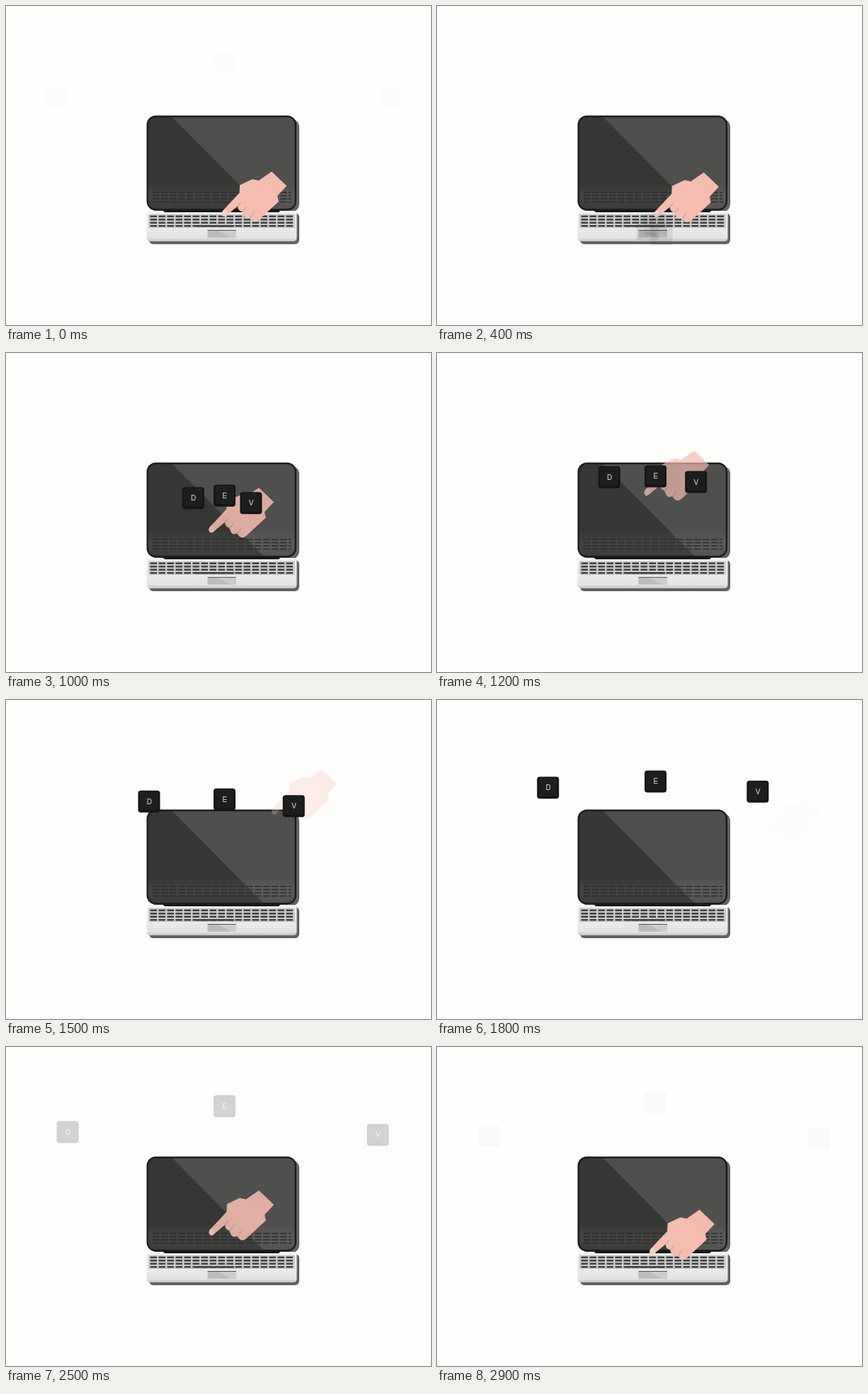
An HTML page that plays this animation: 600x450 px, repeating every 3000 ms.

```html
<!DOCTYPE html>
<html lang="en">
<head>
<meta charset="utf-8">
<title>Laptop keys</title>
<style>
html, body { margin: 0; width: 100%; height: 100%; overflow: hidden; background: #fefefd; }
svg { display: block; width: 600px; height: 450px; }
text { font: 10px "Liberation Sans", Arial, sans-serif; fill: #e4e4e4; text-anchor: middle; }
</style>
</head>
<body>
<svg viewBox="0 0 600 450" xmlns="http://www.w3.org/2000/svg">
  <defs>
    <clipPath id="glass"><rect x="201" y="157" width="206.500" height="129" rx="10"/></clipPath>
    <linearGradient id="sheen" x1="0" y1="0" x2="0" y2="1">
      <stop offset="0" stop-color="#fff" stop-opacity="0"/>
      <stop offset=".5" stop-color="#fff" stop-opacity=".07"/>
      <stop offset="1" stop-color="#fff" stop-opacity=".02"/>
    </linearGradient>
    <linearGradient id="metal" x1="0" y1="0" x2="0" y2="1">
      <stop offset="0" stop-color="#f3f3f3"/>
      <stop offset=".88" stop-color="#e4e4e4"/>
      <stop offset="1" stop-color="#c4c4c4"/>
    </linearGradient>
  </defs>

  <!-- screen -->
  <rect x="204" y="159" width="210" height="132" rx="12" fill="#636363"/>
  <rect x="198.500" y="154.500" width="211.500" height="134" rx="13" fill="#1c1c1c"/>
  <g clip-path="url(#glass)">
    <rect x="198" y="154" width="214" height="136" fill="#363634"/>
    <path d="M232 154H412V290H367Z" fill="#4f4f4d"/>
    <rect x="198" y="250" width="214" height="37" fill="url(#sheen)"/>
    <g id="mirror" stroke="#2a2a2a" stroke-width="2" opacity=".75"/>
  </g>

  <!-- base -->
  <rect x="202" y="292" width="212" height="44" rx="6" fill="#626262"/>
  <path d="M200 289H408Q410.500 289 410.500 292V327Q410.500 332 405 332H204Q198.500 332 198.500 327V292Q198.500 289 200 289Z" fill="url(#metal)"/>
  <path d="M221 288H388L385 291H224Z" fill="#171717"/>
  <rect x="201" y="293.500" width="207" height="19.500" rx="1" fill="#cbcbcb"/>
  <g id="board" stroke="#414141" stroke-width="2.400"/>
  <rect x="284.500" y="316" width="40.500" height="10.800" fill="#bcbcbc"/>
  <path d="M298 316H325V326.800H317Z" fill="#cdcdcd"/>
  <path d="M284.500 316.500H325" stroke="#555"/>

  <g id="hand">
    <path d="M306 295Q304.500 291.500 308 288L330.500 264L331 253L349 244.500L358 246.500L376 234L397 254L384 268L386 276L359 301Q354 306 349 303L345 298Q340 301 337 297L334 290Q329 290 328 282.500L312.500 295.500Q308 299 306 295Z" fill="#f6bfb2"/>
    <path d="M358 246.500L376 234L397 254L383 269Q373 254 358 246.500Z" fill="#f5bcb0"/>
    <path d="M306 295Q304.500 291.500 308 288L311 287L314.500 293.500L312.500 295.500Q308 299 306 295Z" fill="#fad2c6"/>
    <path d="M328 282.500L333 277M335 291L340 284M346 299L351 291" fill="none" stroke="#dc9f91" stroke-width="1.200" stroke-linecap="round"/>
  </g>
  <g id="keys"></g>
</svg>
<script>
const NS = 'http://www.w3.org/2000/svg';
const LOOP = 3000, STEP = 100, PRESS = 220;
const byId = id => document.getElementById(id);
const clamp = v => Math.min(1, Math.max(0, v));

function add(parent, tag, attrs) {
  const el = document.createElementNS(NS, tag);
  for (const k in attrs) el.setAttribute(k, attrs[k]);
  return parent.appendChild(el);
}

// Four rows of dashes for the keyboard and its reflection
function rows(parent, left, right, top) {
  for (let y = top; y < top + 18; y += 4.5) {
    add(parent, 'path', { d: `M${left} ${y}H${right}`, 'stroke-dasharray': '9.5 2.5' });
  }
}
rows(byId('board'), 203.5, 406, 296.8);
add(byId('board'), 'path', { d: 'M268 310.300H322' });
rows(byId('mirror'), 207, 403, 263);

// Smooth curve through points [time, x, y], at rest at both ends
function curve(pts, t) {
  const last = pts.length - 1;
  if (t >= pts[last][0]) return pts[last].slice(1);
  let i = 0;
  while (pts[i + 1][0] < t) i++;
  const a = pts[i], b = pts[i + 1], h = b[0] - a[0], u = (t - a[0]) / h;
  const slope = (n, k) => n === 0 || n === last ? 0
    : (pts[n + 1][k] - pts[n - 1][k]) / (pts[n + 1][0] - pts[n - 1][0]);
  const ease = u * u * (3 - 2 * u);
  return [1, 2].map(k => a[k] + (b[k] - a[k]) * ease
    + h * u * (1 - u) * (slope(i, k) * (1 - u) - slope(i + 1, k) * u));
}

// The hand leaves the keyboard and comes back along the same path
const handPath = [
  [0, 4.5, 4], [480, -12, -12], [720, -19, -31.5], [980, -13, -96],
  [1120, 13, -126], [1270, 65, -137], [1430, 148, -97]
];
const handAlpha = away => clamp(1 - (away / 1430) ** 3);

// Keys rise with a power ease; the outer two swing sideways and lag behind
const rise = t => 63.5 + 171 * (Math.max(0, LOOP - t) / 2300) ** 2.4;
const swing = (t, reach, mid, rate) => reach / (1 + Math.exp((mid - t) / rate));
const lag = (side, t) => 46 * (side / 236) ** 4 + 6 * clamp((1200 - t) / 500);
const keyAlpha = t => clamp((t - 350) / 600) * clamp(((3050 - t) / 1250) * Math.min(1, Math.max(0, 3050 - t) / 1250));

const spots = {
  D: t => {
    const side = swing(t, 245, 1605, 400);
    return [293 - side, rise(t) + lag(side, t) + 1];
  },
  V: t => {
    const side = swing(t, 239, 1640, 380);
    return [293 + side, rise(t) + lag(side, t) + 8];
  },
  E: t => [293, rise(t)]
};

const keys = Object.entries(spots).map(([letter, spot]) => {
  const el = add(byId('keys'), 'g', {});
  add(el, 'rect', { width: 31, height: 31, rx: 4, fill: '#151515' });
  add(el, 'rect', { x: 2.5, y: 1.5, width: 26, height: 26, rx: 3, fill: '#1e1e1e' });
  add(el, 'text', { x: 15.8, y: 19 }).textContent = letter;
  return { el, spot };
});

function place(el, [x, y], alpha) {
  el.setAttribute('transform', `translate(${x.toFixed(2)} ${y.toFixed(2)})`);
  el.setAttribute('opacity', alpha.toFixed(3));
}

function draw(ms) {
  const t = Math.floor((ms % LOOP) / STEP) * STEP;
  const gap = Math.abs(t - PRESS), away = Math.min(gap, LOOP - gap);
  place(byId('hand'), curve(handPath, away), handAlpha(away));
  const k = t < 300 ? t + LOOP : t;
  keys.forEach(({ el, spot }) => place(el, spot(k), keyAlpha(k)));
}

const start = performance.now();
function tick() {
  draw(performance.now() - start);
  requestAnimationFrame(tick);
}
tick();
</script>
</body>
</html>
```
